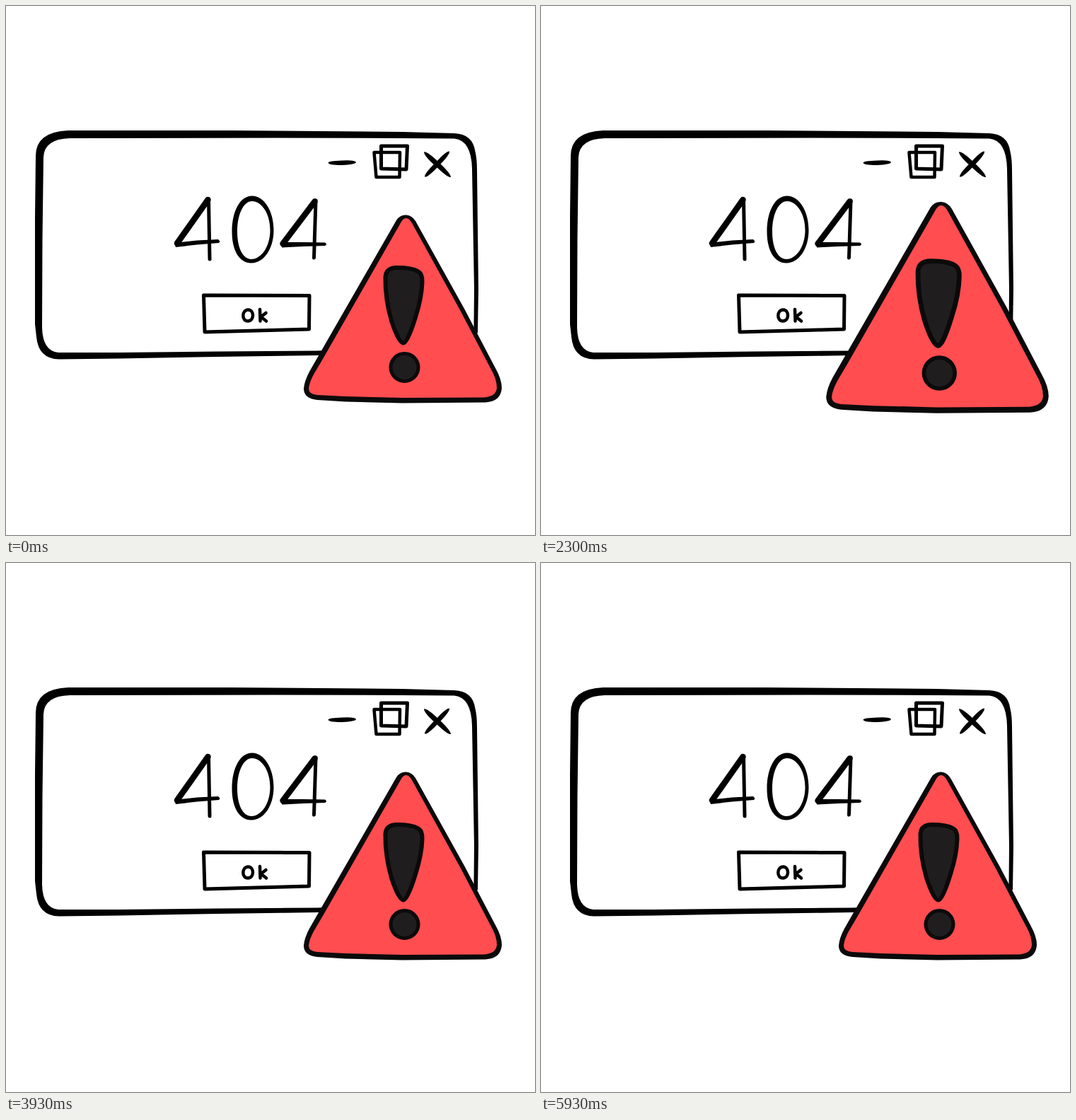
Write an HTML page that moves like this. It is 748 px wide and 748 px high and loops after 6.01 s.

```html
<!DOCTYPE html>
<html lang="en">
<head>
<meta charset="utf-8">
<title>404</title>
<style>
html, body { margin: 0; width: 100%; height: 100%; overflow: hidden; background: #fff; }
svg { display: block; width: 100vw; height: 100vh; }
.ink { fill: none; stroke: #000; stroke-linecap: round; stroke-linejoin: round; }
</style>
</head>
<body>
<svg viewBox="0 0 748 748">
  <!-- window border with uneven thickness -->
  <path fill-rule="evenodd" d="M88 176 L320 176 L560 178 L634 180 Q660 181 663.500 206 Q666 216 666 232 L668 400 L667 462 L640 480 L440 494 L300 496 L160 498.500 L75 499.500 Q46 499 43 468 L41 450 L41 300 L42 212 Q42 178 88 176Z
    M90 187 Q54 188 53 214 L51.500 330 L51 455 Q52 488 74 490 L160 490 L300 488.500 L440 487.500 L630 480 L661.500 455 L662 400 L659 230 Q658 190 634 187.500 L560 187 L380 186.500Z"/>

  <!-- window controls -->
  <path d="M455.500 221.500 Q456 219 475 218.500 Q494 217.500 495 221 Q494 224 475 225 Q456 225 455.500 221.500Z"/>
  <g class="ink" stroke-width="4.500">
    <path d="M520.500 207 L557 207 L556.500 242 L523.500 242Z"/>
    <path d="M530.500 198 L567.500 198 L566 231 L530.500 230Z" stroke-width="5"/>
  </g>
  <path d="M591 206.500 Q595 205 612 221 Q628 236 629 241.500 Q627 245 608 227 Q591 212 591 206.500Z"/>
  <path d="M627 205.500 Q628 210 612 226 Q596 243 592 241.500 Q592 236 608 221 Q622 205 627 205.500Z"/>

  <!-- 404 -->
  <g class="ink" stroke-width="5">
    <path d="M286.500 273 L288 358"/>
    <path d="M285.500 274 L242 335.500" stroke-width="8.500"/>
    <path d="M438 275 L435.500 356"/>
    <path d="M436.500 276.500 L391.500 336" stroke-width="8.500"/>
  </g>
  <path d="M238 335 L270 331.500 L300 330 Q304 333 301 335 L270 337.500 L240 341Z"/>
  <path d="M389 334 L420 334 L451 334.500 Q455 337 451 339 L420 340 L390 341.500Z"/>
  <path fill-rule="evenodd" d="M348 268.500 C365 268.500 378.500 290 378.500 317 C378.500 344 364 363.500 347 363.500 C330 363.500 319.500 346 319.500 319 C319.500 290 331 268.500 348 268.500Z
    M348 276 C336 276 327 294 327 319 C327 342 335 358 347 358 C361 358 373.500 340 373.500 317 C373.500 293 361 276 348 276Z"/>

  <!-- button -->
  <g class="ink">
    <path d="M279.500 409 L429 409.500 L428.500 457 L281 461Z" stroke-width="5"/>
    <path d="M342.500 429.500 C333 430 333 445.500 342 445.500 C351.500 445 351 430 342.500 429.500Z" stroke-width="4.500"/>
    <path d="M359 429 L359.500 445.500 M367.500 434 L360.500 439.500 L368 445.500" stroke-width="4.500"/>
  </g>

  <!-- warning sign -->
  <g id="sign" fill="#0b0a0a">
    <path d="M552 303 Q557 295 566 295.500 Q574 296 579 304 L648 428 L692 512 Q701 528 701 540 Q700 559 678 560.500 L560 561.500 L480 559.500 L440 557 Q421 555 421 541 Q422 530 429 517 L441 496Z"/>
    <path fill="#ff4d50" d="M559 305 Q562 300 566 300 Q570 300 574 307 L642 430 L686 514 Q694 528 694 540 Q693 552 676 553.500 L560 554 L480 552 L440 550 Q428 549 428 541 Q429 532 435 521 L448 499Z"/>
    <g fill="#1f1d1d" stroke="#0b0a0a" stroke-linejoin="round">
      <path stroke-width="6" d="M536.500 384 Q537 370 553 370 Q574 370 583 375.500 Q589 379 588.500 390 Q588 412 579 440 Q568 476 562 476.500 Q555 476 545 445 Q536 414 536.500 384Z"/>
      <circle cx="563.500" cy="511" r="19.500" stroke-width="5"/>
    </g>
  </g>
</svg>
<script>
const LOOP = 6010, LAST_STEP = 5930, HALF = 1000;
const CENTER = [565, 445.5], GROWTH = 0.197;
const sign = document.getElementById('sign');

// cubic-bezier(.33, 0, 0, 1), solved by bisection
function ease(x) {
  let lo = 0, hi = 1;
  for (let i = 0; i < 24; i++) {
    const s = (lo + hi) / 2;
    if (0.99 * s * (1 - s) ** 2 + s ** 3 < x) lo = s; else hi = s;
  }
  return lo * lo * (3 - 2 * lo);
}

// The picture advances at 0 and 30 ms of every 100 ms.
function stepTime(ms) {
  const t = ms % LOOP, base = Math.floor(t / 100) * 100;
  return Math.min(base + (t - base >= 30 ? 30 : 0), LAST_STEP);
}

function draw(ms) {
  const t = stepTime(ms) % (2 * HALF);
  const p = t < HALF ? ease(t / HALF) : 1 - ease((t - HALF) / HALF);
  const [x, y] = CENTER;
  sign.setAttribute('transform',
    `translate(${x} ${y}) scale(${1 + GROWTH * p}) translate(${-x} ${-y})`);
}

const start = performance.now();
function tick() {
  draw(performance.now() - start);
  requestAnimationFrame(tick);
}
tick();
</script>
</body>
</html>
```
